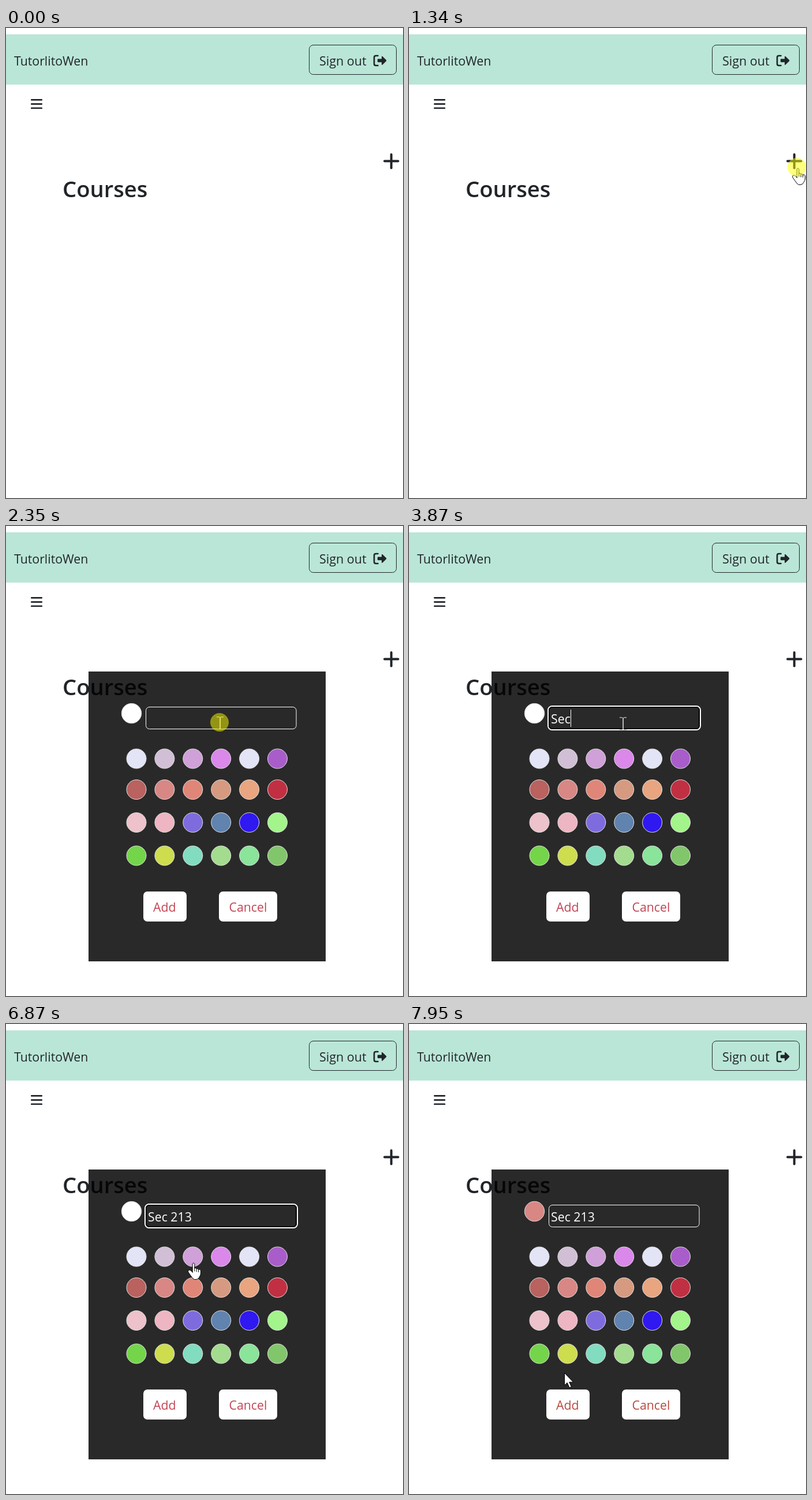
Animation, 688 px wide and 814 px high, one loop 8 s. Source, as an HTML page with a canvas:

```html
<!DOCTYPE html>
<html lang="en">
<head>
<meta charset="utf-8">
<title>Courses</title>
<style>
  html, body { margin: 0; width: 100%; height: 100%; overflow: hidden; background: #fff; }
  canvas { display: block; width: 688px; height: 814px; }
</style>
</head>
<body>
<canvas id="stage" width="688" height="814"></canvas>
<script>
const ctx = document.getElementById('stage').getContext('2d');
const LOOP = 8000, STEP = 68;
const INK = '#212529';
const FONT = '"Open Sans", "Noto Sans", sans-serif';

const SWATCHES = [
  ['#e4e4f7', '#d1bfd6', '#d0a0d8', '#da88e9', '#e4e4f7', '#a95dca'],
  ['#b9625f', '#d88784', '#e08678', '#d69a80', '#e8a580', '#c03042'],
  ['#edc2ca', '#edb6c2', '#7e6cdf', '#6083b0', '#3018f0', '#a3f48a'],
  ['#74d54a', '#cedd4e', '#82dcc0', '#a3dc8e', '#8ae49a', '#82c66c']
];
const ROWS = [403, 456.5, 513.5, 571];
const colX = c => 226 + c * 48.9;

// Moments of the story, in ms
const OPEN = 1400, FOCUS = 2410, BLUR = 7420, PICK = 7550;
const KEYS = [[3420, 'S'], [3610, 'e'], [3870, 'c'], [4270, ' '], [5400, '2'], [5670, '1'], [6000, '3']];
const CLICKS = [[1340, 1400], [2340, 2410], [7420, 7550]];

const easeOut = p => 1 - (1 - p) ** 2;
const smooth = p => p * p * (3 - 2 * p);
const linear = p => p;

// Pointer moves, sampled in steps like a screen capture
const MOVES = [
  { at: 250, steps: 12, from: [616, 830], to: [673, 242], ease: easeOut },
  { at: 1730, steps: 9, from: [673, 242], to: [371, 341], ease: smooth },
  { at: 2610, steps: 1, from: [371, 341], to: [371, 342], ease: linear },
  { at: 6540, steps: 10, from: [371, 342], to: [277, 484], ease: smooth },
  { at: 7280, steps: 2, from: [277, 484], to: [277, 470], ease: linear },
  { at: 7820, steps: 3, from: [297, 390], to: [255, 711], ease: linear }
];

const HAND = new Path2D('M8.2 17V2.5Q10-.8 11.8 2.5V10Q14 8.5 15.2 11Q17.5 10 18.6 12.2Q22.5 11.5 22.5 15V19Q22.3 22.5 19.8 25.5Q18.5 29.5 14 29.5H11.5Q8 28 6 24Q3 20 .8 16.5Q0 13 3.5 13Q6 14 8.2 17Z');
const FINGERS = new Path2D('M11.8 10V15M15.2 11V16M18.6 12.2V16.5');
const ARROW = new Path2D('M.5.8V21.8L5.2 17.3L9 25.8L12.4 24.3L8.7 16.2H15.4Z');
const EXIT = new Path2D('M644.5 48H641Q638 48 638 51V62Q638 65 641 65H644.5');
const EXIT_ARROW = new Path2D('M645 53.5H651V49.8Q651.2 48.3 652.6 49.2L659 55.5Q659.7 56.4 659 57.3L652.6 63.6Q651.2 64.5 651 63V59.3H645Q643.8 59.3 643.8 58V54.8Q643.8 53.5 645 53.5Z');

function text(str, x, y, color, size = 21.3, weight = 400) {
  ctx.font = `${weight} ${size}px ${FONT}`;
  ctx.fillStyle = color;
  ctx.fillText(str, x, y);
}

function box(x, y, w, h, r, fill, stroke, lineWidth = 1) {
  ctx.beginPath();
  ctx.roundRect(x, y, w, h, r);
  paint(fill, stroke, lineWidth);
}

function disc(x, y, r, fill, stroke) {
  ctx.beginPath();
  ctx.arc(x, y, r, 0, 7);
  paint(fill, stroke, 1);
}

function paint(fill, stroke, lineWidth) {
  if (fill) { ctx.fillStyle = fill; ctx.fill(); }
  if (stroke) { ctx.strokeStyle = stroke; ctx.lineWidth = lineWidth; ctx.stroke(); }
}

function drawPage() {
  ctx.fillStyle = '#fff';
  ctx.fillRect(0, 0, 688, 814);
  ctx.fillStyle = '#bae6d7';
  ctx.fillRect(0, 11, 688, 87);
  text('TutorlitoWen', 14, 64.5, INK);

  box(525.5, 29.5, 151, 51, 7, null, INK);
  text('Sign out', 543, 64.5, INK, 21.5);
  ctx.lineCap = 'round';
  ctx.strokeStyle = INK;
  ctx.lineWidth = 2.6;
  ctx.stroke(EXIT);
  ctx.fillStyle = INK;
  ctx.fill(EXIT_ARROW);

  for (let i = 0; i < 3; i++) box(43, 123 + i * 7.2, 20, 2.7, 1.2, INK);
  box(654, 228.6, 27.5, 4, 2, INK);
  box(665.7, 217, 4, 27.5, 2, INK);
  text('Courses', 98, 292.5, INK, 38.2, 600);
}

function drawInput(t) {
  if (t >= FOCUS && t < BLUR) {
    box(241, 312, 264, 41, 7, null, '#fff', 2);
    box(243, 314, 260, 37, 5, null, '#000', 2);
  } else {
    box(242.5, 313.5, 260.5, 38, 6, null, '#fff');
  }
  const typed = KEYS.filter(k => t >= k[0]);
  const str = typed.map(k => k[1]).join('');
  text(str, 246, 342, '#fff');
  if (t < FOCUS || t >= BLUR) return;
  const since = t - (typed.length ? typed[typed.length - 1][0] : FOCUS);
  if (Math.floor(since / 530) % 2 === 0) {
    ctx.fillRect(Math.round(246 + ctx.measureText(str).width), 318, 1, 30);
  }
}

function drawModal(t) {
  ctx.fillStyle = 'rgba(0,0,0,.84)';
  ctx.fillRect(143, 252, 411, 502);
  disc(217.5, 324.5, 17.2, t >= PICK ? SWATCHES[1][1] : '#fff', '#dcdcdc');
  drawInput(t);
  SWATCHES.forEach((row, r) => row.forEach((color, c) =>
    disc(colX(c), ROWS[r], 17, color, '#dedede')));
  const red = t >= PICK ? '#b9493e' : '#c34453';
  box(238, 633, 75, 52, 7, '#fff');
  box(369, 633, 101, 52, 7, '#fff');
  text('Add', 255, 668, red);
  text('Cancel', 386.5, 668, red);
}

function pointerAt(t) {
  const move = MOVES.filter(m => t >= m.at).pop();
  if (!move) return null;
  const k = Math.floor((t - move.at) / STEP) + 1;
  const p = move.ease(Math.min(1, k / move.steps));
  return move.from.map((v, i) => v + (move.to[i] - v) * p);
}

function pointerKind(t, x, y) {
  if (t >= 1070 && Math.hypot(x - 668, y - 231) < 18) return 'hand';
  if (t < OPEN) return 'arrow';
  if (x > 242 && x < 504 && y > 313 && y < 352) return 'beam';
  const over = ROWS.some(cy => [0, 1, 2, 3, 4, 5].some(c => Math.hypot(x - colX(c), y - cy) < 17));
  return over ? 'hand' : 'arrow';
}

function drawBeam() {
  ctx.fillStyle = '#e8e8e8';
  ctx.fillRect(-.7, -10, 1.5, 20);
  ctx.fillStyle = '#b5b5b5';
  for (const y of [-11, 10]) {
    ctx.fillRect(-6, y, 5, 1.4);
    ctx.fillRect(1, y, 5, 1.4);
  }
}

function drawPointer(t) {
  const pos = pointerAt(t);
  if (!pos) return;
  const [x, y] = pos;
  const kind = pointerKind(t, x, y);
  ctx.save();
  ctx.translate(x, y);
  if (kind === 'beam') {
    drawBeam();
  } else {
    if (kind === 'hand') ctx.translate(-9, 0);
    const shape = kind === 'hand' ? HAND : ARROW;
    ctx.lineJoin = 'round';
    ctx.lineWidth = 1;
    ctx.fillStyle = '#fff';
    ctx.strokeStyle = '#000';
    ctx.fill(shape);
    ctx.stroke(shape);
    if (kind === 'hand') ctx.stroke(FINGERS);
  }
  ctx.restore();
  if (CLICKS.some(([a, b]) => t >= a && t < b)) {
    disc(x - 1, y - 1, 16, 'rgba(255,255,0,.5)');
  }
}

const start = performance.now();
function frame() {
  const t = (performance.now() - start) % LOOP;
  drawPage();
  if (t >= OPEN) drawModal(t);
  drawPointer(t);
  requestAnimationFrame(frame);
}
frame();
</script>
</body>
</html>
```
